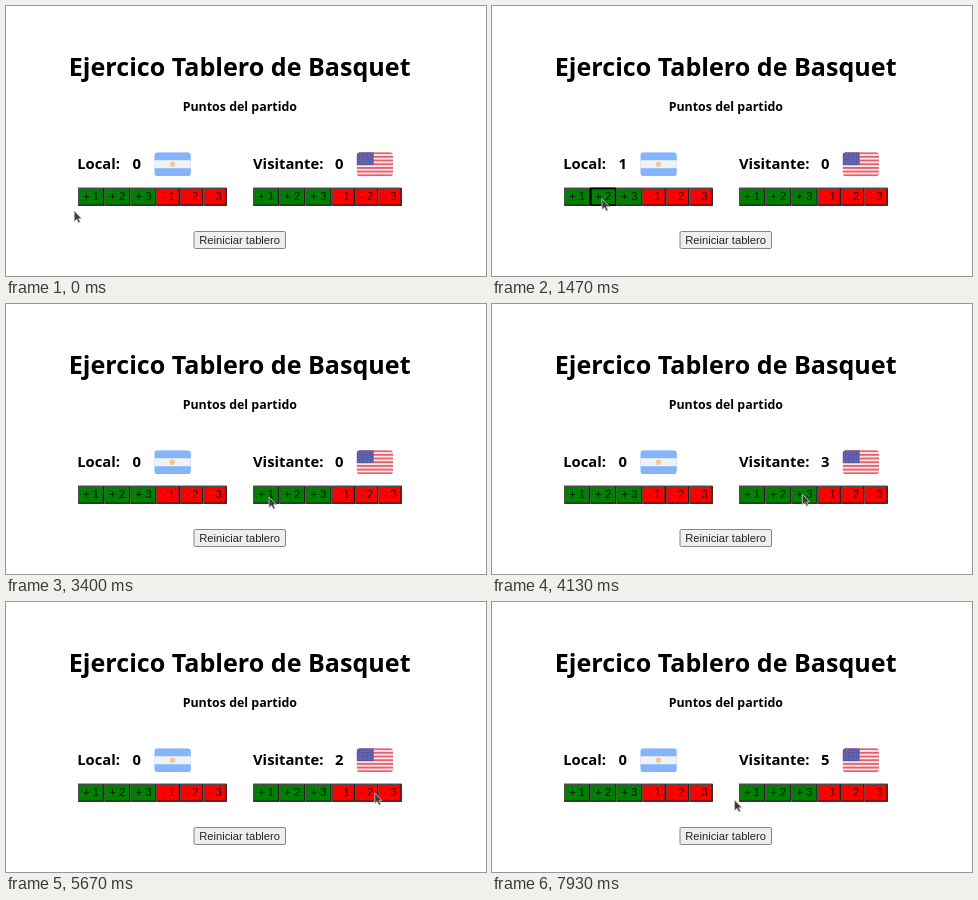
An HTML page that plays this animation: 480 by 270 pixels, repeating every 8000 ms.

```html
<!DOCTYPE html>
<html lang="es">
<head>
<meta charset="utf-8">
<title>Tablero</title>
<style>
html, body { margin: 0; width: 100%; height: 100%; overflow: hidden; background: #fff; }
svg { display: block; }
text { font: bold 14.8px "Open Sans", sans-serif; }
.title { font-size: 25.1px; text-anchor: middle; }
.sub { font-size: 12.4px; text-anchor: middle; }
.btn text { font: 11.2px "Liberation Sans", Arial, sans-serif; text-anchor: middle; fill-opacity: .85; }
.edge { fill: none; stroke-width: 1.3; }
.lit { stroke: #4c4c4c; }
.dark { stroke: #222; }
.down .edge { stroke: #000; stroke-width: 1.7; }
</style>
</head>
<body>
<svg width="480" height="270" viewBox="0 0 480 270">
  <clipPath id="round"><rect width="36.5" height="24" rx="3.5"/></clipPath>
  <text class="title" x="233.7" y="69.6">Ejercico Tablero de Basquet</text>
  <text class="sub" x="233.8" y="105">Puntos del partido</text>
  <text x="71.2" y="163">Local:</text>
  <text class="score" x="126.4" y="163">0</text>
  <text x="247" y="163">Visitante:</text>
  <text class="score" x="329" y="163">0</text>

  <g transform="translate(148.3 146.2)" clip-path="url(#round)">
    <rect width="37" height="24" fill="#86b4fa"/>
    <rect y="8" width="37" height="8" fill="#f0f2f6"/>
    <circle cx="18.2" cy="12" r="2.7" fill="#f0c890"/>
  </g>
  <g id="usa" transform="translate(350.6 146.2)" clip-path="url(#round)">
    <rect width="37" height="24" fill="#f6e8ea"/>
  </g>

  <g id="buttons"></g>
  <g class="btn">
    <rect x="188" y="225.5" width="91.5" height="17" rx="1.5" fill="#efefef" stroke="#858585"/>
    <text x="233.6" y="238">Reiniciar tablero</text>
  </g>
  <path id="cursor" d="M0 0V10.6L2.5 8.4L4.3 12L6 11.2L4.4 7.7H7.5Z"
    fill="#3c3c3c" stroke="#ccc" stroke-width=".8" stroke-linejoin="round"/>
</svg>
<script>
const LOOP = 8000, FPS = 15, HOLD = 133;
const $ = id => document.getElementById(id);

function add(parent, tag, attrs, text = '') {
  const el = document.createElementNS('http://www.w3.org/2000/svg', tag);
  for (const k in attrs) el.setAttribute(k, attrs[k]);
  el.textContent = text;
  return parent.appendChild(el);
}

// Striped flag with its star field
const usa = $('usa'), band = 24 / 13;
for (let i = 0; i < 13; i += 2)
  add(usa, 'rect', { y: i * band, width: 37, height: band, fill: '#e8606c' });
add(usa, 'rect', { width: 17, height: 7 * band, fill: '#5658a4' });
for (let r = 0; r < 7; r++)
  for (let c = 0; c < 5 - r % 2; c++)
    add(usa, 'circle', { cx: 2 + c * 3.2 + r % 2 * 1.6, cy: 1.6 + r * 1.65, r: .45, fill: '#b9b9dc' });

const TOP = 182.3, BOTTOM = 199.2;
const buttons = [];
[72, 247].forEach((x, team) => {
  for (const points of [1, 2, 3, -1, -2, -3]) {
    const plus = points > 0, w = plus ? 26.2 : 23.4;
    const l = x + .65, r = x + w - .65;
    const el = add($('buttons'), 'g', { class: 'btn' });
    add(el, 'rect', { x, y: TOP - .6, width: w, height: BOTTOM - TOP + 1.2, fill: plus ? '#008000' : '#f00' });
    add(el, 'path', { class: 'edge lit', d: `M${l} ${BOTTOM}V${TOP}H${r}` });
    add(el, 'path', { class: 'edge dark', d: `M${l} ${BOTTOM}H${r}V${TOP}` });
    add(el, 'text', { x: x + w / 2, y: 194.4 }, `${plus ? '+' : '-'} ${Math.abs(points)}`);
    buttons.push({ el, team, points, x, end: x + w });
    x += w;
  }
});

// Pointer stops: time, x, y. A stop over a button presses it at that time.
const stops = [
  [0, 68, 205], [870, 84, 194], [1470, 110, 193], [1800, 137, 191], [2330, 169, 188.5],
  [2730, 190, 188], [3130, 213, 188], [3600, 263, 193], [3930, 287, 192], [4270, 313, 190],
  [4800, 347.5, 189], [5470, 378, 190], [5930, 360, 192], [6730, 346.5, 223.5],
  [7130, 311, 188], [7530, 287, 190], [7930, 242.5, 198]
].map(([time, x, y]) => {
  const button = buttons.find(b => y < BOTTOM && x > b.x && x < b.end);
  return { time, x, y, button, leave: time + (button ? HOLD : 0) };
});

// Before a press the pointer arrives early and waits
function pointer(t) {
  const i = stops.findIndex(s => s.time > t);
  const to = stops.at(i), from = i > 0 ? stops[i - 1] : to;
  const travel = (to.time - from.leave) * (to.button ? .4 : 1) || 1;
  const k = Math.min(1, Math.max(0, (t - from.leave) / travel));
  return [from.x + (to.x - from.x) * k, from.y + (to.y - from.y) * k];
}

const scores = document.querySelectorAll('.score');
function draw(now) {
  const t = Math.floor(now % LOOP * FPS / 1000 + .1) * 1000 / FPS % LOOP + 4;
  const total = [0, 0];
  let pressed;
  for (const { time, leave, button } of stops) {
    if (!button || t < time) continue;
    if (t < leave) pressed = button;
    else total[button.team] += button.points;
  }
  scores.forEach((el, i) => el.textContent = total[i]);
  buttons.forEach(b => b.el.classList.toggle('down', b === pressed));
  $('cursor').setAttribute('transform', `translate(${pointer(t)})`);
}

const start = performance.now();
function tick() {
  draw(performance.now() - start);
  requestAnimationFrame(tick);
}
tick();
</script>
</body>
</html>
```
